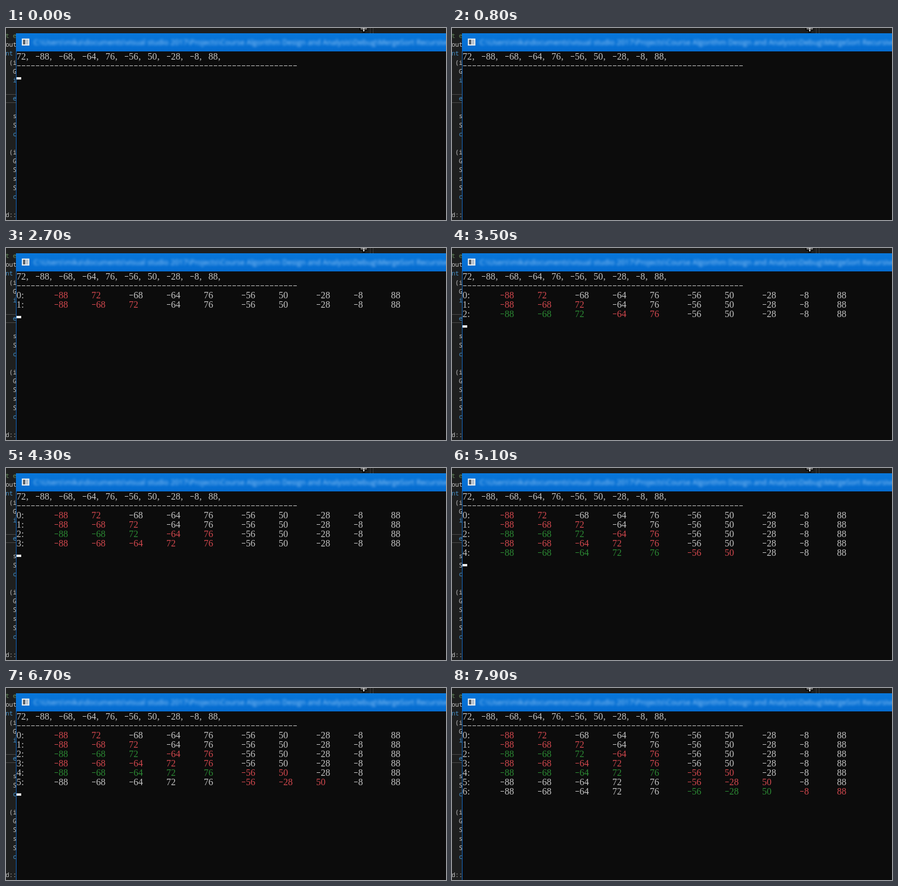
Write an HTML page with a canvas that moves like this. It is 752x328 px and loops after 8000 ms.

```html
<!DOCTYPE html>
<html lang="en">
<head>
<meta charset="utf-8">
<title>Merge sort console</title>
<style>
html, body { margin: 0; width: 752px; height: 328px; overflow: hidden; background: #1e1e1e; }
canvas { display: block; }
</style>
</head>
<body>
<canvas id="stage" width="752" height="328"></canvas>
<script>
const ctx = document.getElementById('stage').getContext('2d');
const LOOP = 8000, CELL = 8, ROW = 16, LEFT = 18, TOP = 41, CURSOR_ON = 680;
const COLORS = { w: '#c4c4c4', r: '#d2484e', g: '#2c8a34' };
const VALUES = [72, -88, -68, -64, 76, -56, 50, -28, -8, 88];
// r: range merged in this step, g: its sorted left neighbour
const STEPS = ['rrwwwwwwww', 'rrrwwwwwww', 'gggrrwwwww', 'rrrrrwwwww',
  'gggggrrwww', 'wwwwwrrrww', 'wwwwwgggrr'];
const TIMES = [900, 2050, 3050, 4050, 5050, 6050, 7050];
const EDITOR = ['t e', 'out', 'nt', ' (i', '  G', '  i', '', '  e', '', '  s', '  S', '  c',
  '', ' (i', '  G', '  S', '  s', '  S', '  c', '', 'd::'];
const EDITOR_BLUE = [2, 5, 7, 11, 18];
const TITLE = 'C:\\Users\\mika\\documents\\visual studio 2017\\Projects\\' +
  'Course Algorithm Design and Analysis\\Debug\\MergeSort Recursive';

let list = VALUES;
const rows = STEPS.map(marks => {
  const from = marks.indexOf('r'), to = marks.lastIndexOf('r') + 1;
  const merged = list.slice(from, to).sort((a, b) => a - b);
  list = [...list.slice(0, from), ...merged, ...list.slice(to)];
  return { list, marks };
});

function rect(x, y, w, h, color) {
  ctx.fillStyle = color;
  ctx.fillRect(x, y, w, h);
}

// Writes text on the console's character grid.
function write(text, col, row, color = COLORS.w) {
  ctx.font = '16px "Liberation Serif", serif';
  ctx.textAlign = 'center';
  ctx.fillStyle = color;
  [...text].forEach((ch, i) => {
    const x = LEFT + (col + i) * CELL, y = TOP + row * ROW;
    if (ch === '-') ctx.fillRect(x + 1, y + 7, 6, 1);
    else if (ch === ',' || ch === ':') ctx.fillText(ch, x + 2.5, y + 13);
    else ctx.fillText(ch, x + 4, y + 13);
  });
}

function drawEditor() {
  rect(0, 0, 752, 328, '#1e1f1f');
  rect(0, 113, 17, 1, '#4a4a4a');
  rect(0, 127, 17, 1, '#4a4a4a');
  ctx.font = '10.5px "Noto Sans Mono", monospace';
  ctx.textAlign = 'left';
  EDITOR.forEach((text, i) => {
    ctx.fillStyle = i === 0 ? '#638a5b' : EDITOR_BLUE.includes(i) ? '#4590c8' : '#c4c4c4';
    ctx.fillText(text, -0.8, 16.6 + i * 15.3);
  });
  // tab corner and move pointer
  for (let y = 0; y < 9; y += 2) {
    rect(622, y, 1, 1, '#555');
    rect(627, y, 1, 1, '#555');
  }
  rect(604, 0, 14, 4, '#080808');
  rect(609, 0, 5, 8, '#080808');
  rect(606, 1, 11, 1, '#fff');
  rect(611, 0, 1, 6, '#fff');
  rect(610, 4, 3, 1, '#fff');
}

function drawWindow() {
  rect(17, 9, 735, 319, '#1667bd');
  rect(18, 40, 734, 288, '#0c0c0c');
  const bar = ctx.createLinearGradient(0, 9, 0, 40);
  bar.addColorStop(0, '#0877da');
  bar.addColorStop(1, '#056bcf');
  rect(17, 9, 735, 31, bar);
  rect(27, 18, 13, 12, '#e4e9ee');
  rect(29, 20, 4, 8, '#56616c');
  rect(34, 20, 4, 8, '#b4bfca');

  ctx.save();
  ctx.filter = 'blur(2px)';
  ctx.font = '12.6px "Open Sans", sans-serif';
  ctx.textAlign = 'left';
  ctx.fillStyle = '#a4d0fa';
  ctx.fillText(TITLE, 47, 29);
  ctx.restore();
}

function draw(t) {
  drawEditor();
  drawWindow();
  write(VALUES.join(', ') + ',', 0, 0);
  write('-'.repeat(60), 0, 1);

  const shown = TIMES.filter(time => time <= t).length;
  rows.slice(0, shown).forEach(({ list, marks }, i) => {
    write(i + ':', 0, i + 2);
    list.forEach((n, k) => write(String(n), 8 * (k + 1), i + 2, COLORS[marks[k]]));
  });

  const lastWrite = shown ? TIMES[shown - 1] : -100;
  if (t - lastWrite < CURSOR_ON) rect(LEFT, TOP + (shown + 2) * ROW + 11, 8, 4, '#f2f2f2');
}

const start = performance.now();
function tick() {
  draw((performance.now() - start) % LOOP);
  requestAnimationFrame(tick);
}
tick();
</script>
</body>
</html>
```
